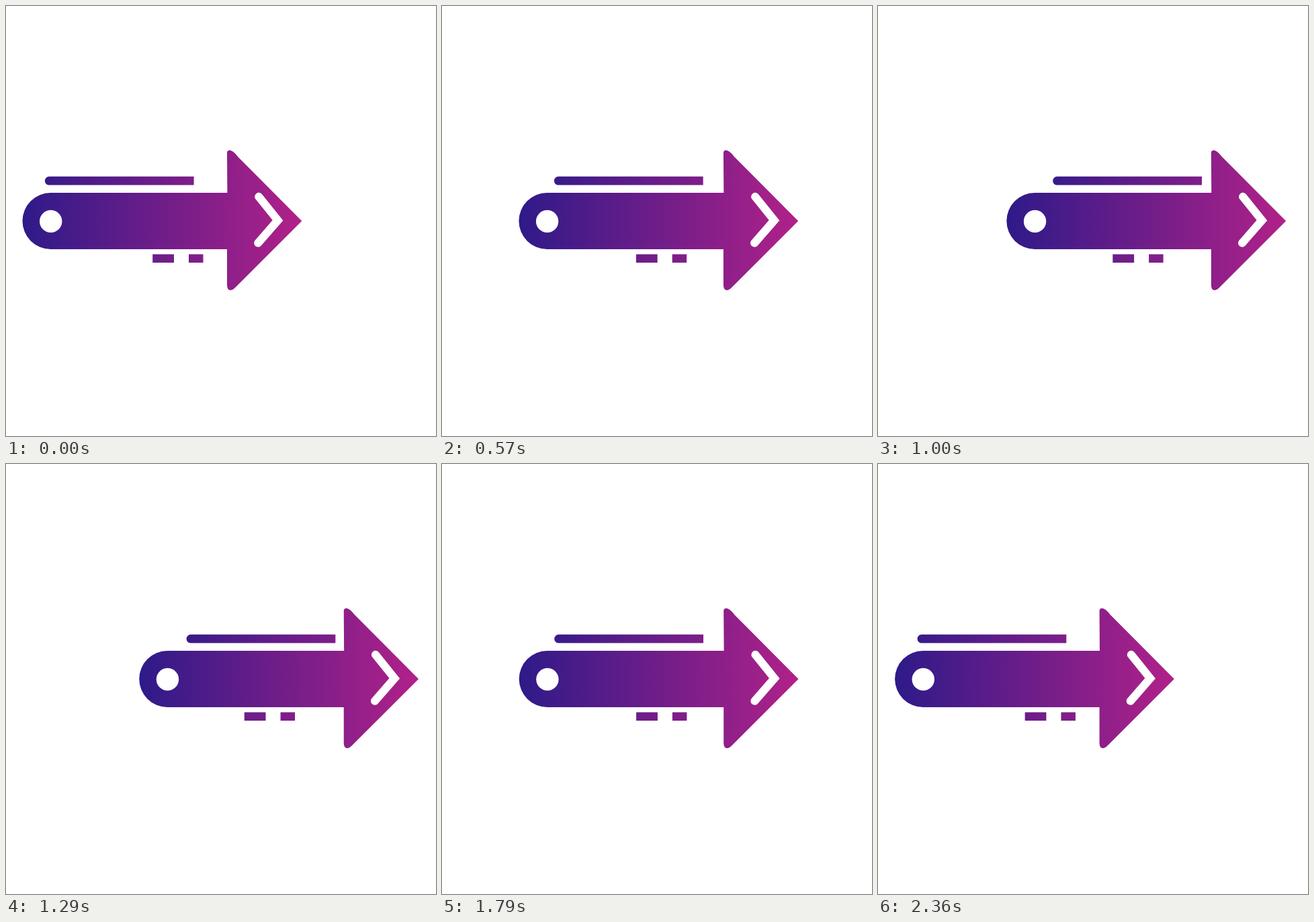
Recreate the animation shown at these times as an HTML page. Size 640x640 px, loop 2.43 s.

```html
<!DOCTYPE html>
<html lang="en">
<head>
<meta charset="utf-8">
<title>Sliding arrow</title>
<style>
  html, body { margin: 0; width: 100%; height: 100%; overflow: hidden; background: #fff; }
  svg { display: block; width: 100vw; height: 100vh; }
</style>
</head>
<body>
<svg viewBox="0 0 640 640">
  <defs>
    <linearGradient id="ink" gradientUnits="userSpaceOnUse" x1="24.5" y1="0" x2="440.5" y2="0">
      <stop offset="0" stop-color="#2e1a89"/>
      <stop offset="1" stop-color="#b12189"/>
    </linearGradient>
  </defs>
  <g id="bar" fill="url(#ink)">
    <path d="M279.6 253.8V266.6H64.2A6.4 6.4 0 0 1 64.2 253.8Z"/>
  </g>
  <g id="dashes" fill="url(#ink)">
    <path d="M218.2 369.4H250V382H218.2ZM272 369.4H293.5V382H272Z"/>
  </g>
  <g id="arrow">
    <path fill="url(#ink)" d="M66.5 278H329.4L329 219C328.8 216 330.4 214.6 333 214.7C337 215 341 219 345 224.2
      L440.3 320L341.5 418.8C338.5 421.8 336.3 423 334 423C330.2 423 329 419 329 414.5V362H66.5A42 42 0 0 1 66.5 278Z"/>
    <circle cx="66.7" cy="320.5" r="16.7" fill="#fff"/>
    <path d="M376.2 283.8L404.6 319L375.2 352.8" fill="none" stroke="#fff" stroke-width="12"
      stroke-linecap="round" stroke-linejoin="miter"/>
  </g>
</svg>
<script>
  const LOOP = 2430, FPS = 14, LAST = 33, LEG = 16;
  const REACH = 179.8, REST = 0.6;

  // Each part travels its own share of the arrow's distance.
  const parts = [["arrow", 1], ["bar", 1.213], ["dashes", 0.786]]
    .map(([id, share]) => ({ el: document.getElementById(id), share }));

  const ease = u => u - 0.075 * Math.sin(2 * Math.PI * u);

  function shift(step) {
    if (step <= LEG) return REACH * ease(step / LEG);
    return REACH - (REACH - REST) * ease((step - LEG - 1) / LEG);
  }

  function draw(ms) {
    const step = Math.min(LAST, Math.floor((ms % LOOP + 5) * FPS / 1000));
    const dx = shift(step);
    for (const { el, share } of parts) {
      el.setAttribute("transform", `translate(${(dx * share).toFixed(2)} 0)`);
    }
  }

  const start = performance.now();
  function tick() {
    draw(performance.now() - start);
    requestAnimationFrame(tick);
  }
  tick();
</script>
</body>
</html>
```
